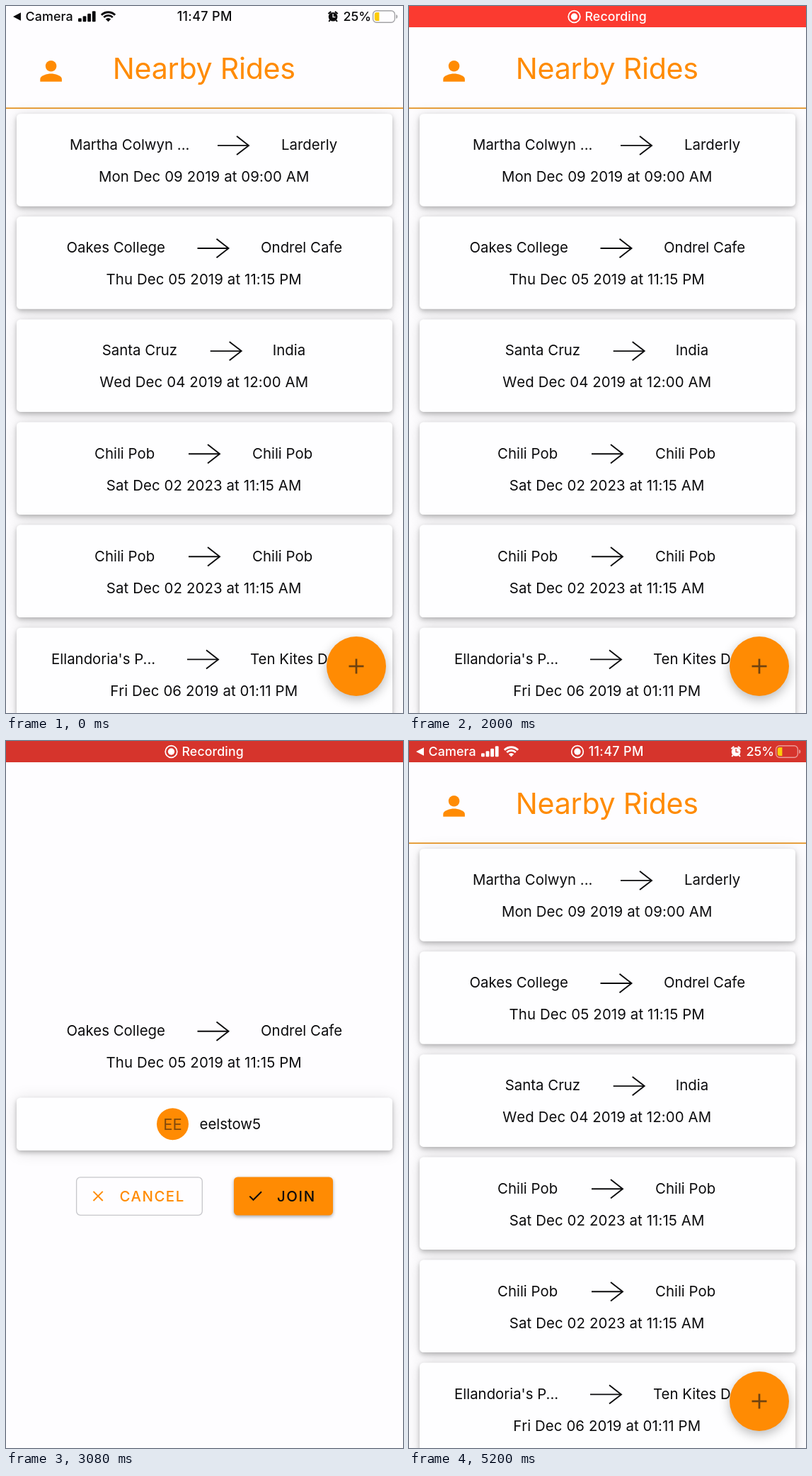
These frames come from a looping animation (561 by 998 pixels, 5240 ms). An HTML page with a canvas:

```html
<!DOCTYPE html>
<html lang="en">
<head>
<meta charset="utf-8">
<title>Nearby Rides</title>
<style>
html, body { margin: 0; width: 100%; height: 100%; overflow: hidden; background: #fefdff; }
canvas { display: block; }
</style>
</head>
<body>
<canvas id="stage" width="561" height="998"></canvas>
<script>
const ctx = document.getElementById('stage').getContext('2d');
const W = 561, H = 998, LOOP = 5240;
const PAGE = '#fefdff', ORANGE = '#ff8b03', INK = '#0b0b0d';
const FAMILY = 'Inter, "Open Sans", sans-serif';

// Moments of the story, in ms
const RED_IN = 100, RED_DONE = 340;
const OPEN = 2440, HEADER_OFF = 2600;
const CLOCK_IN = 3180, CLOCK_DONE = 3420;
const BACK = 4280, FULL_HEIGHT = 4400;

// from, to, date, x of from, x of arrow, x of to
const rides = [
  ['Martha Colwyn ...', 'Larderly', 'Mon Dec 09 2019 at 09:00 AM', 90, 299, 389],
  ['Oakes College', 'Ondrel Cafe', 'Thu Dec 05 2019 at 11:15 PM', 85.5, 270.5, 360],
  ['Santa Cruz', 'India', 'Wed Dec 04 2019 at 12:00 AM', 135.7, 288.7, 376.7],
  ['Chili Pob', 'Chili Pob', 'Sat Dec 02 2023 at 11:15 AM', 125, 258, 348],
  ['Chili Pob', 'Chili Pob', 'Sat Dec 02 2023 at 11:15 AM', 125, 258, 348],
  ["Ellandoria's P...", 'Ten Kites Do...', 'Fri Dec 06 2019 at 01:11 PM', 64, 256, 345]
];

const clamp = v => Math.max(0, Math.min(1, v));
const ramp = (t, a, b) => clamp((t - a) / (b - a));

function text(str, x, y, size = 20.4, color = INK, opt = {}) {
  ctx.font = `${opt.weight || 400} ${size}px ${FAMILY}`;
  ctx.letterSpacing = (opt.spacing || 0) + 'px';
  ctx.fontKerning = opt.kerning || 'auto';
  ctx.textAlign = opt.align || 'left';
  ctx.fillStyle = color;
  ctx.fillText(str, x, y);
}

function line(points, color, width) {
  ctx.beginPath();
  points.forEach(([x, y], i) => i ? ctx.lineTo(x, y) : ctx.moveTo(x, y));
  ctx.strokeStyle = color;
  ctx.lineWidth = width;
  ctx.stroke();
}

function rect(x, y, w, h, color) {
  ctx.fillStyle = color;
  ctx.fillRect(x, y, w, h);
}

function disc(x, y, r, color) {
  ctx.beginPath();
  ctx.arc(x, y, r, 0, 7);
  ctx.fillStyle = color;
  ctx.fill();
}

function roundPath(x, y, w, h, r) {
  ctx.beginPath();
  ctx.roundRect(x, y, w, h, r);
}

function shadowed(dy, blur, alpha, draw) {
  ctx.save();
  ctx.shadowColor = `rgba(0,0,0,${alpha})`;
  ctx.shadowOffsetY = dy;
  ctx.shadowBlur = blur;
  draw();
  ctx.restore();
}

function card(y, h) {
  const draw = () => {
    roundPath(15, y, 531, h, 5.5);
    ctx.fillStyle = '#fefeff';
    ctx.fill();
  };
  shadowed(2, 22, 0.13, draw);
  shadowed(3, 6, 0.24, draw);
}

function route(ride, y) {
  const [from, to, date, x1, xa, x2] = ride;
  text(from, x1, y + 7);
  text(to, x2, y + 7);
  text(date, 279.7, y + 52, 20.4, INK, { align: 'center', spacing: 0.1, kerning: 'none' });
  line([[xa, y + 0.7], [xa + 44, y + 0.7]], INK, 1.9);
  line([[xa + 27, y - 12.5], [xa + 44, y + 0.7], [xa + 27, y + 13.9]], INK, 1.9);
}

function header() {
  disc(63.6, 84.8, 7.8, ORANGE);
  ctx.beginPath();
  ctx.moveTo(63.6, 95.5);
  ctx.bezierCurveTo(58.5, 95.5, 48.3, 98, 48.3, 103);
  ctx.lineTo(48.3, 106.8);
  ctx.lineTo(78.9, 106.8);
  ctx.lineTo(78.9, 103);
  ctx.bezierCurveTo(78.9, 98, 68.7, 95.5, 63.6, 95.5);
  ctx.fill();
  text('Nearby Rides', 279.8, 103, 41.2, ORANGE, { align: 'center', spacing: -0.28 });
  rect(0, 143.4, W, 1.7, '#e28d18');
}

function list(t) {
  rides.forEach((ride, i) => {
    const y = 152.2 + i * 145.1;
    card(y, 130.5);
    route(ride, y + 44);
  });
  if (t >= BACK && t < FULL_HEIGHT) rect(0, 988, W, 10, PAGE);
  shadowed(5, 15, 0.27, () => disc(495, 932, 42, ORANGE));
  line([[484.5, 932], [505.5, 932]], '#6f4210', 2.7);
  line([[495, 921.5], [495, 942.5]], '#6f4210', 2.7);
}

function details(dy) {
  ctx.save();
  ctx.translate(0, dy);
  route(rides[1], 409);
  card(503.5, 74.5);
  disc(235.5, 540.7, 22.5, ORANGE);
  text('EE', 235.5, 548.6, 22, '#824a0c', { align: 'center' });
  text('eelstow5', 273.5, 547.8);

  roundPath(99.6, 615.9, 177.7, 53.4, 5.5);
  ctx.strokeStyle = '#c6c6ca';
  ctx.lineWidth = 1.3;
  ctx.stroke();
  line([[123.5, 635.8], [136.7, 649]], ORANGE, 1.9);
  line([[136.7, 635.8], [123.5, 649]], ORANGE, 1.9);
  text('CANCEL', 160.5, 650, 20.4, ORANGE, { weight: 500, spacing: 1.5 });

  shadowed(2, 5, 0.35, () => {
    roundPath(322, 615.4, 140, 54.2, 5.5);
    ctx.fillStyle = ORANGE;
    ctx.fill();
  });
  line([[344.3, 642.6], [349.5, 647.8], [361, 636.2]], INK, 2);
  text('JOIN', 383, 650, 20.4, INK, { weight: 500, spacing: 1.6 });
  ctx.restore();
}

function recordDot(x, color) {
  ctx.beginPath();
  ctx.arc(x, 15, 8.3, 0, 7);
  ctx.strokeStyle = color;
  ctx.lineWidth = 1.7;
  ctx.stroke();
  disc(x, 15, 4.7, color);
}

function wifi(color) {
  const a = Math.PI * 0.25;
  ctx.strokeStyle = color;
  [[13.6, 2.9], [8.9, 2.7]].forEach(([r, w]) => {
    ctx.beginPath();
    ctx.arc(144.5, 22.3, r, -Math.PI / 2 - a, -Math.PI / 2 + a);
    ctx.lineWidth = w;
    ctx.stroke();
  });
  ctx.beginPath();
  ctx.moveTo(144.5, 22.3);
  ctx.arc(144.5, 22.3, 5.3, -Math.PI / 2 - a, -Math.PI / 2 + a);
  ctx.fillStyle = color;
  ctx.fill();
}

function alarm(color, back) {
  line([[455.5, 11], [459.3, 7.8]], color, 2.2);
  line([[468.7, 11], [464.9, 7.8]], color, 2.2);
  line([[458, 19.5], [456.3, 22]], color, 2);
  line([[466.2, 19.5], [467.9, 22]], color, 2);
  disc(462.1, 15.2, 6.3, color);
  line([[462.1, 11], [462.1, 15.6], [465.4, 15.6]], back, 1.3);
}

function statusItems(color, frame, back, recording) {
  ctx.beginPath();
  ctx.moveTo(10, 15);
  ctx.lineTo(21, 9.3);
  ctx.lineTo(21, 20.7);
  ctx.fillStyle = color;
  ctx.fill();
  text('Camera', 27.5, 21.3, 17.9, color, { weight: 450, spacing: 0.1 });
  [5, 8, 11.5, 15].forEach((h, i) => {
    roundPath(102 + i * 6.6, 22.3 - h, 4.8, h, 1.2);
    ctx.fill();
  });
  wifi(color);
  if (recording) recordDot(238, color);
  text('11:47 PM', recording ? 253.7 : 241.7, 21.3, 18, color, { weight: 500, spacing: 0.35 });
  alarm(color, back);
  text('25%', 476.5, 21.3, 17.9, color, { weight: 450 });

  roundPath(518.6, 6.7, 30.8, 16.6, 5);
  ctx.strokeStyle = frame;
  ctx.lineWidth = 1.4;
  ctx.stroke();
  roundPath(520.8, 8.9, 6.6, 12.2, [3, 0, 0, 3]);
  ctx.fillStyle = '#fccb0a';
  ctx.fill();
  roundPath(551.2, 12.2, 2, 5.6, [0, 2, 2, 0]);
  ctx.fillStyle = frame;
  ctx.fill();
}

function faded(alpha, draw) {
  if (alpha <= 0) return;
  ctx.save();
  ctx.globalAlpha = alpha;
  draw();
  ctx.restore();
}

function statusBar(t) {
  const glow = clamp(0.5 + Math.cos((t - 2120) / 2080 * 2 * Math.PI));
  const mix = (a, b) => Math.round(a + (b - a) * glow);
  const red = `rgb(${mix(214, 251)},${mix(52, 58)},${mix(44, 48)})`;
  const on = ramp(t, RED_IN, RED_DONE);
  const clock = ramp(t, CLOCK_IN, CLOCK_DONE);

  faded(1 - on, () => statusItems(INK, '#a3a3a6', PAGE, false));
  faded(on, () => rect(0, 0, W, 30, red));
  faded(on * (1 - clock), () => {
    recordDot(233.5, '#fff');
    text('Recording', 248.5, 21.3, 17.7, '#fff', { weight: 500, spacing: 0.15 });
  });
  faded(clock, () => statusItems('#fff', 'rgba(255,255,255,.5)', red, true));
}

function draw(now) {
  const t = now % LOOP;
  const open = t >= OPEN && t < BACK;
  const headed = t < HEADER_OFF || t >= BACK;
  rect(0, 0, W, H, PAGE);
  if (open) details(headed ? 149 : 0);
  else list(t);
  if (headed) header();
  statusBar(t);
}

function tick() {
  draw(performance.now());
  requestAnimationFrame(tick);
}
tick();
</script>
</body>
</html>
```
